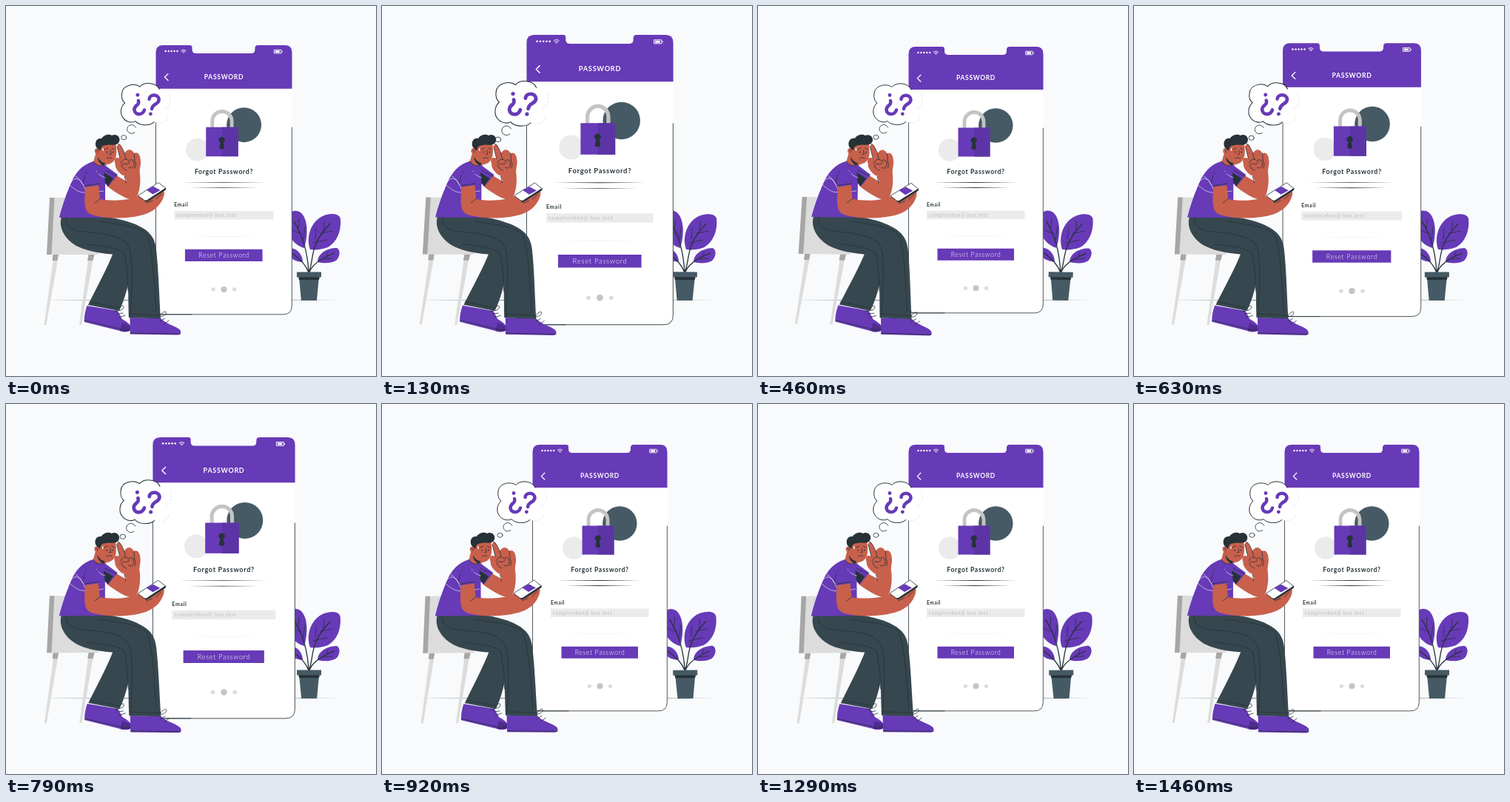
An HTML page for the animation above (1.5 s loop, 500 px wide and 500 px high).

```html
<!DOCTYPE html>
<html lang="en">
<head>
<meta charset="utf-8">
<title>Forgot password</title>
<style>
  html, body { margin: 0; width: 100%; height: 100%; overflow: hidden; background: #f8fafc; }
  svg { display: block; width: 100%; height: 100%; }
  text { font-family: Lato, sans-serif; letter-spacing: .65px; }
  .purple { fill: #673ab7; }
  .slate { fill: #455a64; }
  .cloth { fill: #37474f; }
  .dark { fill: #263238; }
  .skin { fill: #c8604c; }
  .pale { fill: #dcdcdc; }
  .grey { fill: #a6a6a6; }
  .white { fill: #fff; }
  .line, .stem { fill: none; stroke: #263238; stroke-width: .8; stroke-linecap: round; stroke-linejoin: round; }
  .stem { stroke-width: 1.3; }
  .light { fill: none; stroke: #fff; stroke-linecap: round; stroke-linejoin: round; }
  .mark { fill: none; stroke: #673ab7; stroke-width: 4.5; stroke-linecap: round; }
</style>
</head>
<body>
<svg viewBox="0 0 500 500">
  <path d="M50 397.700L250 397.200 452 397.700 250 398.200Z" class="dark"/>

  <g id="plant">
    <g class="purple">
      <path d="M403 327C408 312 409 288 398 279C389 273 379 279 379 293C379 308 388 323 403 327Z"/>
      <path d="M411 329C405 312 412 290 430 283C442 279 452 281 452 289C453 305 447 319 435 326C427 329 418 330 411 329Z"/>
      <path d="M421 346C421 335 433 327 447 327C452 329 452 338 446 344C439 348 429 348 421 346Z"/>
      <path d="M401 346C401 335 392 326 382 327C376 333 384 345 401 346Z"/>
    </g>
    <path class="stem" d="M409 360C408 340 404 315 389 291M409 360C417 344 408 325 438 294M410 360C413 350 424 342 443 334M409 360C405 350 399 343 386 334"/>
    <path class="line" d="M402 315L404 299M399 308L386 303M395 301L396 288M415 320L434 316M418 315L419 300M425 307L441 304M429 303L430 291M429 342L441 341M433 339L435 332"/>
    <path class="slate" d="M396 366H423L420 398H399Z"/>
    <path class="dark" d="M395 365H424L423 370H396Z"/>
    <path class="slate" d="M393 359.500H426V366.500H393Z"/>
  </g>

  <g id="phone">
    <path class="white" d="M203.500 100H385.500V403Q385.500 415 373.500 415H213Q203.500 415 203.500 405Z"/>
    <path class="line" d="M385.300 165V403Q385.300 414.800 373.500 414.800H213Q203.500 414.800 203.500 405V113"/>
    <path class="line" d="M207 414.800H252"/>
    <path class="purple" d="M203.500 113V64.500Q203.500 55 213 55H249Q252 55 252 58V61Q252 66 257 66H331Q336 66 336 61V59Q336 55 340 55H376Q385.500 55 385.500 64.500V113Z"/>
    <g class="white">
      <circle cx="216.500" cy="63" r="1.200"/><circle cx="220.500" cy="63" r="1.200"/><circle cx="224.400" cy="63" r="1.200"/>
      <circle cx="228.300" cy="63" r="1.200"/><circle cx="232.200" cy="63" r="1.200"/>
      <circle cx="240.500" cy="65" r=".7"/><path d="M363 62.200H369V64.800H363Z"/>
    </g>
    <path class="light" stroke-width=".9" d="M237.300 62.200Q240.500 59.600 243.700 62.200M238.700 63.800Q240.500 62.300 242.300 63.800M362 61.200H371V65.800H362ZM372.300 62.800V64.200"/>
    <path class="light" stroke-width="1.300" d="M219.800 93.200L215.300 97.600 219.800 102"/>
    <circle class="slate" cx="321.300" cy="161.500" r="23.200"/>
    <circle cx="259" cy="194.500" r="15.200" fill="#ebebeb"/>
    <path d="M279 166V156.500A13 13 0 0 1 305 156.500V166" fill="none" stroke="#c4c4c4" stroke-width="4.800"/>
    <path class="purple" d="M270.500 164.500H313.500V203.500H270.500Z"/>
    <path d="M292 164.500H313.500V203.500H292Z" fill="#5d34a5"/>
    <path class="dark" d="M289.800 185Q287.500 183.500 287.500 181.800A4.200 4.200 0 0 1 295.900 181.800Q295.900 183.500 293.600 185L295 191Q295.300 194 291.700 194Q288 194 288.400 191Z"/>
    <path class="dark" d="M237 238.500L294 238.100 351 238.500 294 238.900ZM247 245.500L294 245.100 341 245.500 294 245.900Z"/>
    <path fill="#e6e6e6" d="M240 310.500L294 310.200 348 310.500 294 310.800Z"/>
    <path fill="#ebebeb" d="M228 276.500H360.500V288H228Z"/>
    <path class="purple" d="M242.500 327.800H346V343.800H242.500Z"/>
    <g text-anchor="middle">
      <text class="white" x="294.500" y="100.400" font-size="8.500" font-weight="700">PASSWORD</text>
      <text class="dark" x="294.500" y="227" font-size="8.600" font-weight="700">Forgot Password?</text>
      <text class="white" x="294.500" y="338.900" font-size="8.700" font-weight="300">Reset Password</text>
    </g>
    <text class="dark" x="228" y="271" font-size="6.600" font-weight="700">Email</text>
    <text x="231" y="284.600" font-size="6.600" fill="#bdbdbd">sampleinbox@ box.test</text>
    <circle class="pale" cx="280.300" cy="381.300" r="2.600"/>
    <circle cx="294.500" cy="381.300" r="4" fill="#c4c4c4"/>
    <circle class="pale" cx="308.500" cy="381.300" r="2.600"/>
  </g>

  <g id="bubble">
    <path class="white" d="M181 109.500C174 104 158 107 157 118C156 124 158 129 161 131C155 136 154 146 159 151.500C163 157 171 158 175 155.500C180 162 195 162 200 156.500C208 160 219 157 218 148C219 143 217 140 215 139C222 136 224 125 220 119C217 114 211 112 207 114C204 104 187 102 181 109.500Z"/>
    <path class="line" style="stroke-width:1" d="M207 113C204 104 187 102 181 109.500C174 104 158 107 157 118C156 124 158 129 161 131C155 136 154 146 159 151.500C163 157 171 158 175 155.500C180 162 195 162 200 156.500"/>
    <path class="line" style="stroke:#c8c8c8;stroke-width:.5" stroke-dasharray="2 3" d="M200 156.500C208 160 219 157 218 148M215 139C222 136 224 125 220 119"/>
    <path class="mark" d="M179 128C181 135 174 133 173.500 140C174 148 185 148 187 140.500M193.500 126C194 119 206 119 206.500 126.500C206 134 198 131 197 139"/>
    <circle class="purple" cx="178" cy="120.500" r="2.400"/>
    <circle class="purple" cx="195.300" cy="145.800" r="2.400"/>
    <ellipse class="white" cx="170" cy="166.300" rx="6" ry="5.800"/>
    <path class="line" d="M174 170.500A6 5.800 0 1 1 175.500 164"/>
    <ellipse class="line" style="fill:#fff" cx="159.500" cy="177.300" rx="3.500" ry="3"/>
  </g>

  <g id="person">
    <!-- chair -->
    <path class="pale" d="M64 259H125V336H60ZM64 343H70L54.500 431H51.500ZM111 343H117.500L102 431H99Z"/>
    <path class="grey" d="M59 259H65.500L61.500 336H55ZM63.500 336H71L69.500 344H62.500ZM111.500 336H119.500L117.500 344H110Z"/>

    <!-- shoes -->
    <path class="purple" d="M109.500 405C107 412 105.500 420 106 427L158 440Q168 441 171 436Q168 429 157 423L151 412Z"/>
    <path d="M154 439L157 428L171 434Q169 441 158 440Z" fill="#4f2c8e"/>
    <path class="line" d="M106 425L160 437.500Q167 438 171 436"/>
    <path class="purple" d="M167.500 421L168 443.500L233 444.500Q238 443 235.500 438C230 432 218 431 209 422Z"/>
    <path class="line" d="M168 442L236 443M148 413C153 406 160 402 159 408C157 412 151 411 147 413M150 416L158 415M152 421L161 418M206 421C211 413 218 410 216 416C213 420 209 419 205 421M208 426L215 422M213 430L220 425"/>

    <!-- trousers -->
    <path class="cloth" d="M145 333C138 352 124 378 111 404L153 412Q164 390 170 350L172 325Z"/>
    <path class="cloth" d="M75 285C70 300 81 317 97 325C113 333 138 336 161 336C166 362 165 392 166 421L209 422.500C207 390 206 355 203 329C201 309 190 302 175 295C160 289 148 287 133 284Z"/>
    <path class="line" d="M81 286C81 298 88 303 104 305C130 307 154 310 164 322C173 336 170 380 168 419M110 322C130 324 150 326 160 334Q164 352 165 385M113 400L153 408M167 416L209 418M125 291C158 296 182 298 191 310C197 325 200 365 203 412"/>

    <!-- far arm -->
    <path class="skin" d="M149 229L163 237L157 222L180 221C183 235 181 253 175 261C166 264 149 253 136 243Z"/>
    <path class="line" d="M160 230Q162 236 162 239"/>

    <!-- torso -->
    <path class="skin" d="M122 196L118 211L132 222L136 214L134 202Z"/>
    <path class="purple" d="M118 210C104 214 94 224 87 241C80 258 75 273 72 286H134L134 240L138 244L151 228L132 214Q127 220 118 210Z"/>
    <path class="dark" d="M132 225L145 233L138 243L134 239Z"/>
    <path class="line" d="M118 210Q124 219 132 214.500M134 222L150 230M109 224Q104 233 104 244"/>
    <path class="light" stroke-width=".8" opacity=".75" d="M83 250C87 235 94 229 101 237C108 247 113 253 132 250M86 242C94 249 100 253 107 252M94 230C103 236 104 243 107 248M122 223Q126 230 134 232"/>

    <!-- near arm and handset -->
    <path class="skin" d="M107 244L125 241L127 261C145 264 165 263 178 257C188 252 198 251 206 248Q216 247 213.500 256C210 268 202 276 189 281C168 288 137 288 119 283C104 280 106 267 107 244Z"/>
    <path class="purple" d="M107 226L124 224Q127 233 126 242L106 245Z"/>
    <path class="line" d="M106 243L126 240M120 266Q123 264 127 261"/>
    <path class="line" style="fill:#fff" d="M178.500 256L206 238.500L216 246.500L190 264.500Z"/>
    <path class="purple" d="M189.500 248.500L199 243.800L208.500 249L198.500 254.500Z"/>
    <path class="dark" d="M187 262.500L190 265.500L216 248.500V245.500L190 262.500Z"/>
    <path class="skin" d="M188 267Q191 262.500 199 262L209 254Q214.500 251 212.500 258L203 272H190Z"/>
    <path class="line" d="M190 266L198 263M203 261L210 254"/>

    <!-- head -->
    <path class="skin" d="M126 186L148 184C150 196 150 205 145 210C140 215 132 216 127 209Z"/>
    <path class="dark" d="M124 204Q127 211 134 212.500L132 216Q126 213 124 207Z"/>
    <circle class="skin" cx="123.500" cy="196" r="3.800"/>
    <path class="dark" d="M122 191C119 185 122 178 129 179C133 173 140 173 143 175C149 172 155 177 153 183C150 190 142 187 138 187.500C133 189 129 187 127.500 195L126 195Z"/>
    <path class="line" d="M133 194L138 192M143 192L147 194M136 206Q139 203.500 143 205.500M141 195L142 200.500 139.500 200.500M122 195Q125 195 124 198"/>
    <circle class="dark" cx="136.300" cy="197.500" r=".9"/><circle class="dark" cx="144.700" cy="197.500" r=".9"/>
    <ellipse class="white" cx="131" cy="194" rx=".8" ry="2"/>

    <!-- raised hand -->
    <path class="skin" d="M147.500 213C145 207 148 203 154 206L150 190Q151 184 155 188L160 199C164 192 170 193 173 199C179 196 182 203 182 212L180 226L158 229C152 225 147 219 147.500 213Z"/>
    <path class="line" d="M152 186Q157 190 160 199M150 190L154 206M160 199L162 207M173 199L174 210M155 212C158 205 165 206 167 211Q165 215 158 213M167 208Q173 206 173 215Q171 221 166 218M174 210Q177 214 174 219M156 214Q157 221 163 222"/>
  </g>
</svg>
<script>
  const LOOP = 1500, FRAMES = 36, PEAK = 1.093;
  const PULSE = [[0, 1], [.1, PEAK], [.3, 1], [.4, 1], [.5, PEAK], [.6, 1], [1, 1]];
  const SWAY = [[0, 0], [.25, 1], [.75, -1], [1, 0]];
  const byId = id => document.getElementById(id);

  function valueAt(keys, phase) {
    const i = keys.findIndex(([p]) => p > phase);
    const [p0, v0] = keys[i - 1], [p1, v1] = keys[i];
    return v0 + (v1 - v0) * (phase - p0) / (p1 - p0);
  }
  function scale(id, s, x, y) {
    byId(id).setAttribute('transform', `translate(${x} ${y}) scale(${s}) translate(${-x} ${-y})`);
  }
  function rotate(id, angle, x, y) {
    byId(id).setAttribute('transform', `rotate(${angle} ${x} ${y})`);
  }

  const start = performance.now();
  function draw() {
    // Stepped at 24 pictures per second
    const step = Math.floor((performance.now() - start + 4) / LOOP * FRAMES) % FRAMES;
    const phase = step / FRAMES + .012;
    const pulse = valueAt(PULSE, phase), sway = valueAt(SWAY, phase);
    scale('phone', pulse, 294.5, 235);
    scale('bubble', pulse, 189, 142.5);
    rotate('person', sway, 144, 309);
    rotate('plant', sway, 414, 337);
    requestAnimationFrame(draw);
  }
  draw();
</script>
</body>
</html>
```
